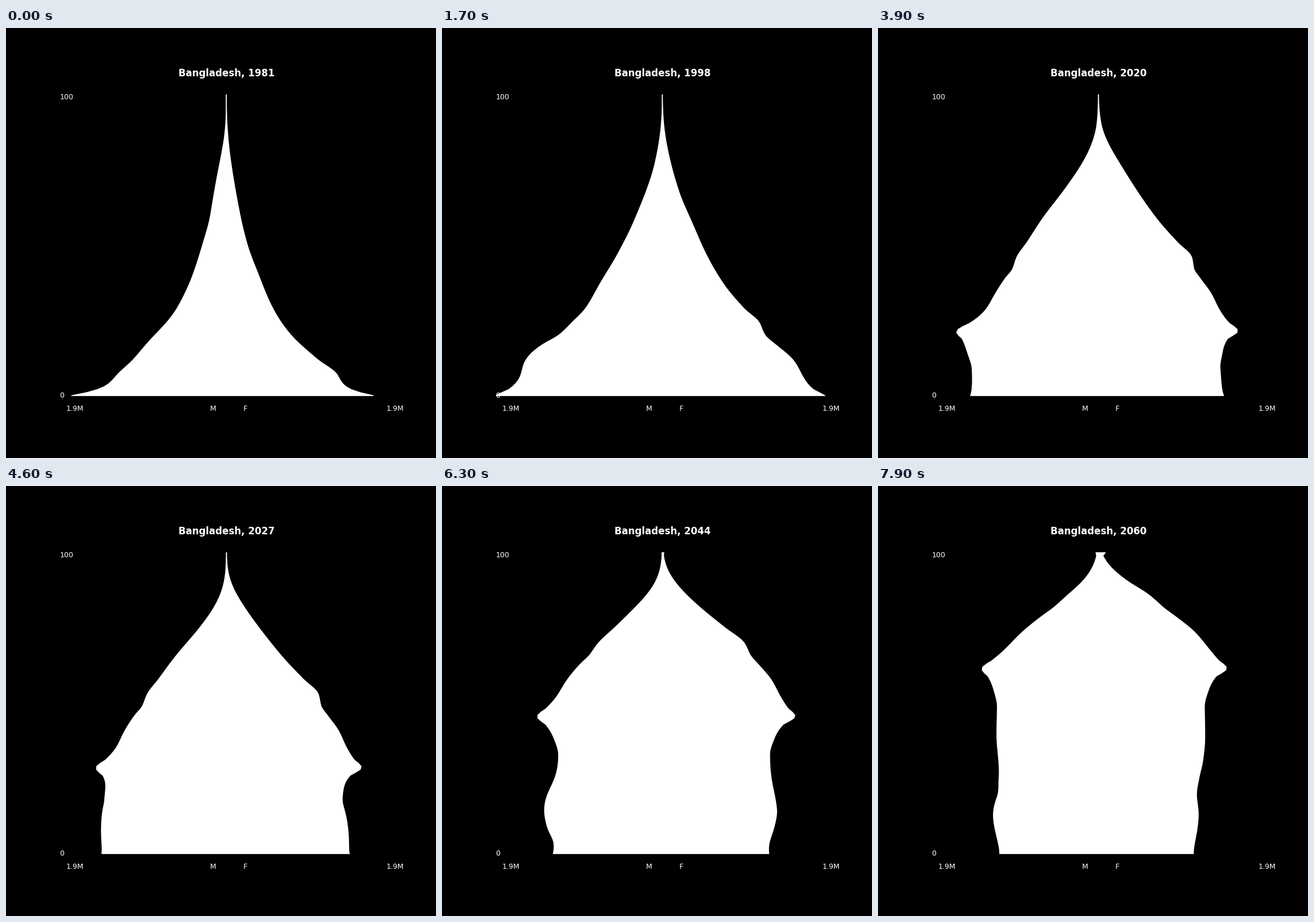
Recreate the animation shown at these times as a matplotlib script. Size 748x748 px, loop 8 s.

```python
import numpy as np
import matplotlib.pyplot as plt
from matplotlib.animation import FuncAnimation

SIZE, DPI = 748, 100
FIRST, LAST = 1981, 2060
TOP = 100                                  # ages 100 and over share one row
YEARS = np.arange(FIRST, LAST + 1)
AGES = np.arange(TOP + 1)

# Adult size of the men and women born in a year, as a half width in px
COHORTS = [
    (1879, 0, 0), (1891, 22, 9), (1901, 30.6, 13.4), (1921, 35.5, 27),
    (1931, 46.5, 38.5), (1941, 61, 57), (1951, 83, 78), (1961, 111.5, 107.5),
    (1969, 132.5, 141), (1974, 148, 165), (1978, 153.5, 168),
    (1981, 165, 178), (1986, 180, 196), (1992, 194, 210),
    (1996, 210.5, 222.5), (1998, 223, 233), (1999, 222, 231),
    (2001, 207.5, 212), (2006, 190, 194.5), (2011, 181, 186.5),
    (2022, 178, 185.5), (2029, 172.5, 181), (2035, 165, 171.5),
    (2041, 154, 161), (2046, 152.5, 157), (2060, 138.5, 141.5),
]
BORN, MEN, WOMEN = np.array(COHORTS, float).T


def smooth(x, y, q):
    """Monotone cubic through (x, y), evaluated at q."""
    h = np.diff(x)
    d = np.diff(y) / h
    a, b = d[:-1], d[1:]
    wa, wb = 2 * h[1:] + h[:-1], h[1:] + 2 * h[:-1]
    ok = a * b > 0
    m = np.concatenate([d[:1], 0 * a, d[-1:]])
    m[1:-1][ok] = ((wa + wb) * a * b)[ok] / (wa * b + wb * a)[ok]
    i = np.clip(np.searchsorted(x, q, side="right") - 1, 0, len(h) - 1)
    t = (q - x[i]) / h[i]
    return (y[i] * (1 + 2 * t) * (1 - t) ** 2 + y[i + 1] * t * t * (3 - 2 * t)
            + h[i] * t * (1 - t) * (m[i] * (1 - t) - m[i + 1] * t))


def half_widths(sizes, lifespan, spread, leavers, boom, leave_age, leave_spread,
                infant):
    """Half width for each year and age: cohorts shrink as they grow older."""
    age = np.arange(TOP + 3)[None, :]
    born = YEARS[:, None] - age
    # old age: Gompertz mortality, with later cohorts living longer
    life = lifespan + 0.2 * np.maximum(born - 1931, 0)
    alive = np.exp(-np.exp((age - life) / spread))
    # youth: some leave around one age, most of those born near 1983
    share = leavers + boom * np.exp(-((born - 1983) / 10) ** 2)
    young = share / (1 + np.exp((age - leave_age) / leave_spread))
    # infancy: early losses that fade over the decades
    early = infant * np.exp(-np.maximum(born - FIRST, 0) / 10) + 0.02
    baby = early * np.exp(-age / 2)
    width = smooth(BORN, sizes, born) * alive * (1 + young + baby)
    width[:, TOP] = width[:, TOP:].sum(axis=1)
    return width[:, :TOP + 1]


men = half_widths(MEN, 77, 12.5, 0.22, 0.13, 21, 3.3, 0.27)
women = half_widths(WOMEN, 82.4, 11, 0.15, 0.05, 17.5, 4, 0.22)

plt.rcParams["font.family"] = "DejaVu Sans"
fig, ax = plt.subplots(figsize=(SIZE / DPI, SIZE / DPI), dpi=DPI,
                       facecolor="black")
span = SIZE * 0.775 / 2
ax.set(xlim=(-span, span), ylim=(-5, 105))
ax.axis("off")


def label(x, y, text, **style):
    style = {"fontsize": 9, "color": "white", **style}
    return ax.text(x, y, text, transform=ax.transAxes, **style)


title = label(0.5, 1.01, "", fontsize=12, weight="bold", ha="center")
label(0, 0.94, "100")
label(0, 0.04, "0")
label(0.02, 0, "1.9M")
label(0.45, 0, "M")
label(0.55, 0, "F")
label(0.98, 0, "1.9M")
shape, = ax.fill([0, 0, 0], [0, 0, 0], fc="white", ec="white", lw=1,
                 joinstyle="round")


def update(i):
    x = np.concatenate([-men[i], women[i][::-1]])
    y = np.concatenate([AGES, AGES[::-1]])
    shape.set_xy(np.column_stack([x, y]))
    title.set_text(f"Bangladesh, {YEARS[i]}")
    return shape, title


anim = FuncAnimation(fig, update, frames=len(YEARS), interval=100,
                     repeat=True, repeat_delay=0)
plt.show()
```
